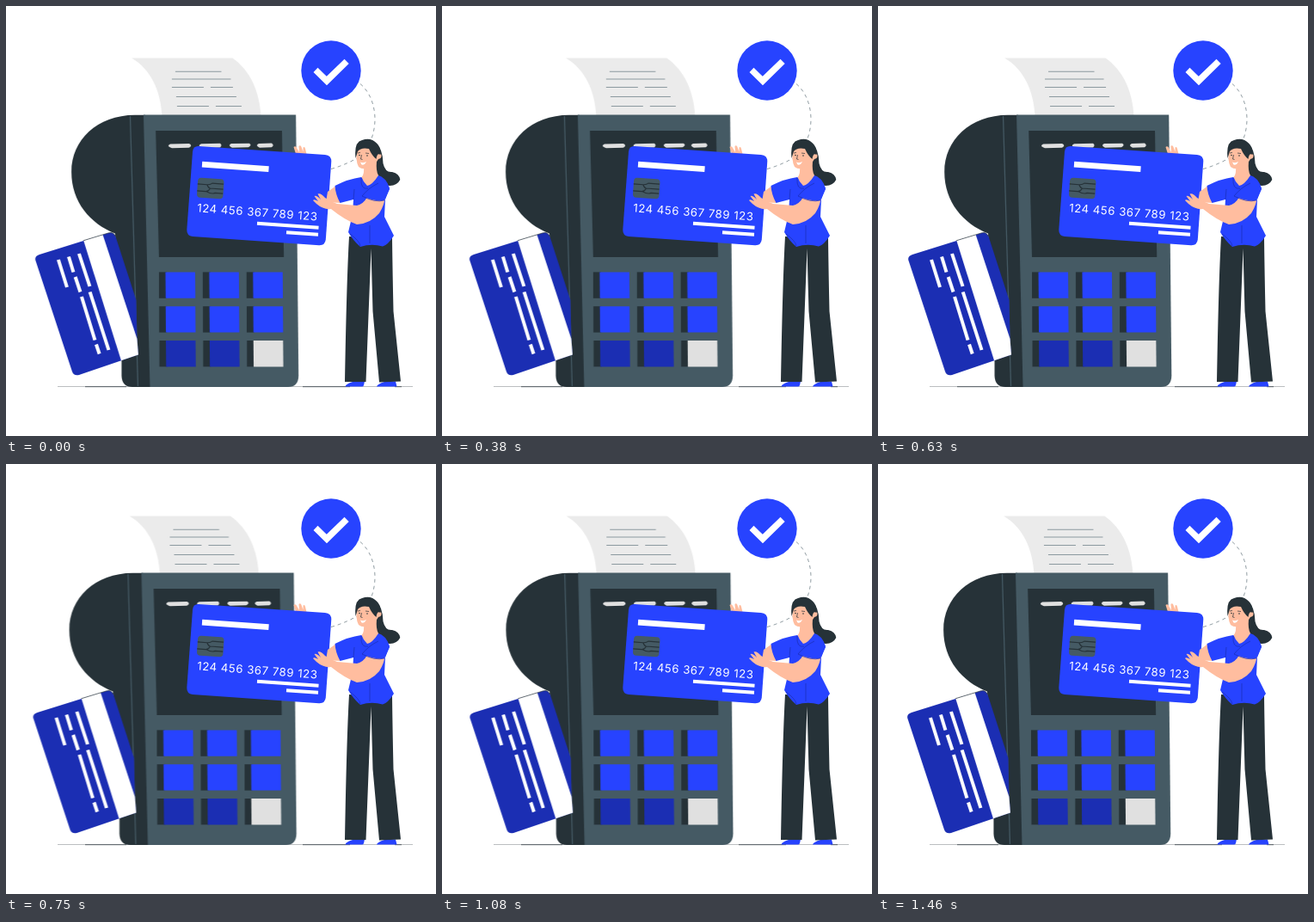
Write an HTML page that moves like this. It is 500 by 500 pixels and loops after 1.5 s.

```html
<!DOCTYPE html>
<html lang="en">
<head>
<meta charset="utf-8">
<title>Card payment</title>
<style>
  html, body { margin: 0; width: 100%; height: 100%; overflow: hidden; background: #fff; }
  svg { display: block; width: 100%; height: 100%; }
  .blue { fill: #2743ff; }
  .navy { fill: #1b2eb3; }
  .dark { fill: #263238; }
  .slate { fill: #455a64; }
  .pale { fill: #e0e0e0; }
  .skin { fill: #ffbd9f; }
  .white { fill: #fff; }
  .line { fill: none; stroke: #263238; stroke-width: .7; }
  .dash { fill: none; stroke: #455a64; stroke-width: .6; stroke-dasharray: 4 4; }
  .bars { fill: none; stroke: #fff; stroke-width: 4; }
  .number { font: 13.2px Inter, "Open Sans", sans-serif; letter-spacing: .55px; fill: #fff; }
  #terminal { animation: shake 1.5s linear -25ms infinite; }
  @keyframes shake {
    0%, 100% { transform: translateX(0); }
    10%, 90% { transform: translateX(-1px); }
    20%, 80% { transform: translateX(2px); }
    30%, 50%, 70% { transform: translateX(-4px); }
    40%, 60% { transform: translateX(4px); }
  }
</style>
</head>
<body>
<svg viewBox="0 0 500 500">
  <path class="line" opacity=".45" d="M60 442.5H473"/>
  <path class="line" d="M92 442.700H140M345 442.700H400M452 442.700H460"/>

  <g id="terminal">
    <g id="receipt">
      <path fill="#ebebeb" d="M146.200 60.500H263.500C284 75 295 99 296.500 128H181.500C180 99 169 74 146.200 60.500Z"/>
      <path fill="none" stroke="#8b999f" stroke-width="1.100" d="M197 76.300H250.500M193 85H261.500M193 94.500H230M238 94.500H264M198 105.500H268M199 116.500H236M244 116.500H274"/>
    </g>

    <g id="body">
      <path class="dark" d="M162 126.800H150C106 127 76.200 156 76.200 193C76.200 228 98 253 127 264.500L134.500 400V430Q135 443 147 443H170Z"/>
      <path class="slate" d="M160 126.500H337.200L340.300 430Q340 443 328 443H167.500Z"/>
      <path fill="none" stroke="#455a64" stroke-width="1.300" d="M144.500 128L153.500 442"/>
      <path class="dark" d="M174.200 145H321L323.200 292H178Z"/>
      <g class="pale">
        <path d="M191 160.500L213 160Q217.500 162 213 164.800L193 165.200Q186 163 191 160.500Z"/>
        <path d="M227 160.300L249 159.800Q252 162 249 164.400L229 165.200Q221.500 163 227 160.300Z"/>
        <path d="M262 160L283 159.800Q286.500 162 282 164.200L263 164.700Q257.500 162 262 160Z"/>
        <path d="M294 160L309 159.500Q312.500 162 309 164.200L295 164.700Q289.500 162 294 160Z"/>
      </g>
      <g id="keys"></g>
    </g>

    <g id="back-card">
      <path class="navy" d="M39 289L119 264Q125 262 127.500 268L151.500 342L152.500 387L154 405.500L85 429Q79 430.500 77 425L34.500 296Q33 291 39 289Z"/>
      <path class="white" d="M90.300 272.700L112.500 265.500L152.500 387L154 405.500L134 412.300Z"/>
      <path class="line" d="M90 272.800L119 264Q125 262 127.500 268"/>
      <path class="bars" d="M61 295L71 327M73 291.500L78.500 309.500M80.700 315L86.500 332.500M85 288L97.500 326M88 338L103.500 388.500M105 393.500L108.700 404.500M97.700 332.500L119.500 400"/>
    </g>
  </g>

  <g id="badge">
    <circle class="blue" cx="378" cy="75" r="34.700"/>
    <path class="white" d="M357.500 77L362.500 71.800L372.800 81.800L393.500 61.800L398.700 67L373 92.300Z"/>
    <path class="dash" d="M412 90.500C429 105 434 134 423.500 158M378 189.500Q394 185 408 177"/>
  </g>

  <path class="skin" d="M337 172L334.500 164Q336 162.500 337.500 164L341 170L340.500 163Q342 161.500 343.300 163.500L345.500 169.500L345.500 164.500Q347.500 163 348 166L350 174Z"/>

  <g id="front-card">
    <path class="blue" d="M224 163L371 172.900Q378.500 173.700 378.300 180.700L371.800 271.500Q371 278.500 364 278.200L217 268Q210 267.200 210.300 260L217 169.200Q217.700 162.700 224 163Z"/>
    <path fill="none" stroke="#fff" stroke-width="6.800" d="M228 184.200L305.500 189.700"/>
    <path class="bars" d="M292 252.700L363.500 257.700M326 263.300L363 265.700"/>
    <g transform="translate(237.500 212) rotate(4)">
      <rect class="slate" x="-15" y="-11.500" width="30.500" height="23" rx="4"/>
      <path class="line" style="stroke-width:1.200" d="M-15 -4H-4Q0 -4 2 -6H15M-15 4H-5Q-2 4 0 0H15M-4 -4Q-2 0 0 0M-4 4Q2 7 6 5H15"/>
    </g>
    <text class="number" transform="translate(222 239.300) rotate(4.200)">124 456 367 789 123</text>
  </g>

  <g id="woman">
    <path class="blue" d="M398 436.500H417L416 441Q415.500 442.500 414 442.500H394.500Q395 439.500 403 437ZM436 436.500H453L454.500 442.500H431Q432 439.500 440 437Z"/>
    <path class="dark" d="M399 268Q396 320 394 437H418.500L424.500 282L426.500 355L434 437.500L459 436.500L450.500 355Q449.500 310 449 270Z"/>
    <path class="dark" d="M428 160L436 168Q438.500 175 438.500 183Q441 194 449 193Q457.500 195 458.300 202Q454 210.500 442 208.500Q432 207 429 196Z"/>
    <path class="skin" d="M384 209L374 216L372 228L389 229L393 220Z"/>
    <path class="blue" d="M382.500 209Q398 201 413 199Q423 203 432 196.500Q442 199 446 212L441 225L440 245L451 267Q444 278 438 279.500Q425 276 412 280Q403 272 398 263L403 242L404 225L388.500 229Q383 219 382.500 209Z"/>
    <path class="skin" d="M416 184L431 180Q430 192 433 197Q426 208 420 209Q415 204 413.500 199Q417 196 416 184Z"/>
    <path class="skin" d="M408 165Q406 180 410 187Q415 191 421 188Q430 184 433 178Q438 177 436 172Q433 170 430 174L426 160Q415 157 408 165Z"/>
    <path class="dark" d="M406.500 177Q404.500 158 414 156Q424 152 431.500 160Q437 166 435.500 173Q431.500 170 430.500 178Q425.500 174 422 166Q413 164 409 169Z"/>
    <path class="line" d="M409 171L412 170.500M418 171L422 171.500M413.500 173L412.500 178L414.500 178.500"/>
    <circle class="dark" cx="411" cy="173.500" r=".8"/>
    <circle class="dark" cx="420" cy="174" r=".8"/>
    <path class="white" d="M412 181.500Q415.500 183 419 181Q417 185.500 413.500 184.500Z"/>
    <path class="skin" d="M420 222L442 217Q440 232 434 241Q424 253 408 254Q394 249 378 236Q369 237 361 230L357 226Q358 224 363 227L358.500 221Q361 220 366 225L362.500 218.500Q366 217 371 223Q378 228 385 230L408 232Q416 230 420 222Z"/>
    <path class="blue" d="M414 221Q422 207 436 201Q444 204 446 213L440 226Q429 228 414 221Z"/>
    <path class="line" style="stroke:#1b2eb3" d="M414 221Q429 229 440 226M414 221Q422 211 433 206M413 200Q412 214 421 212M404 225L405 213M400 265Q411 273 412 279M423 255V276"/>
  </g>
</svg>
<script>
  const keys = document.getElementById('keys');
  const addPath = (cls, d) => {
    const path = document.createElementNS('http://www.w3.org/2000/svg', 'path');
    path.setAttribute('class', cls);
    path.setAttribute('d', d);
    keys.append(path);
  };

  for (let row = 0; row < 3; row++) {
    for (let col = 0; col < 3; col++) {
      const x = 178 + col * 50.9 + row * .25;
      const y = 309.4 + row * 39.8;
      const face = row < 2 ? 'blue' : col < 2 ? 'navy' : 'pale';
      addPath('dark', `M${x} ${y}h9v30.4h-9z`);
      addPath(face, `M${x + 7.5} ${y}h34.5l.3 30.4h-34.500z`);
    }
  }
</script>
</body>
</html>
```
